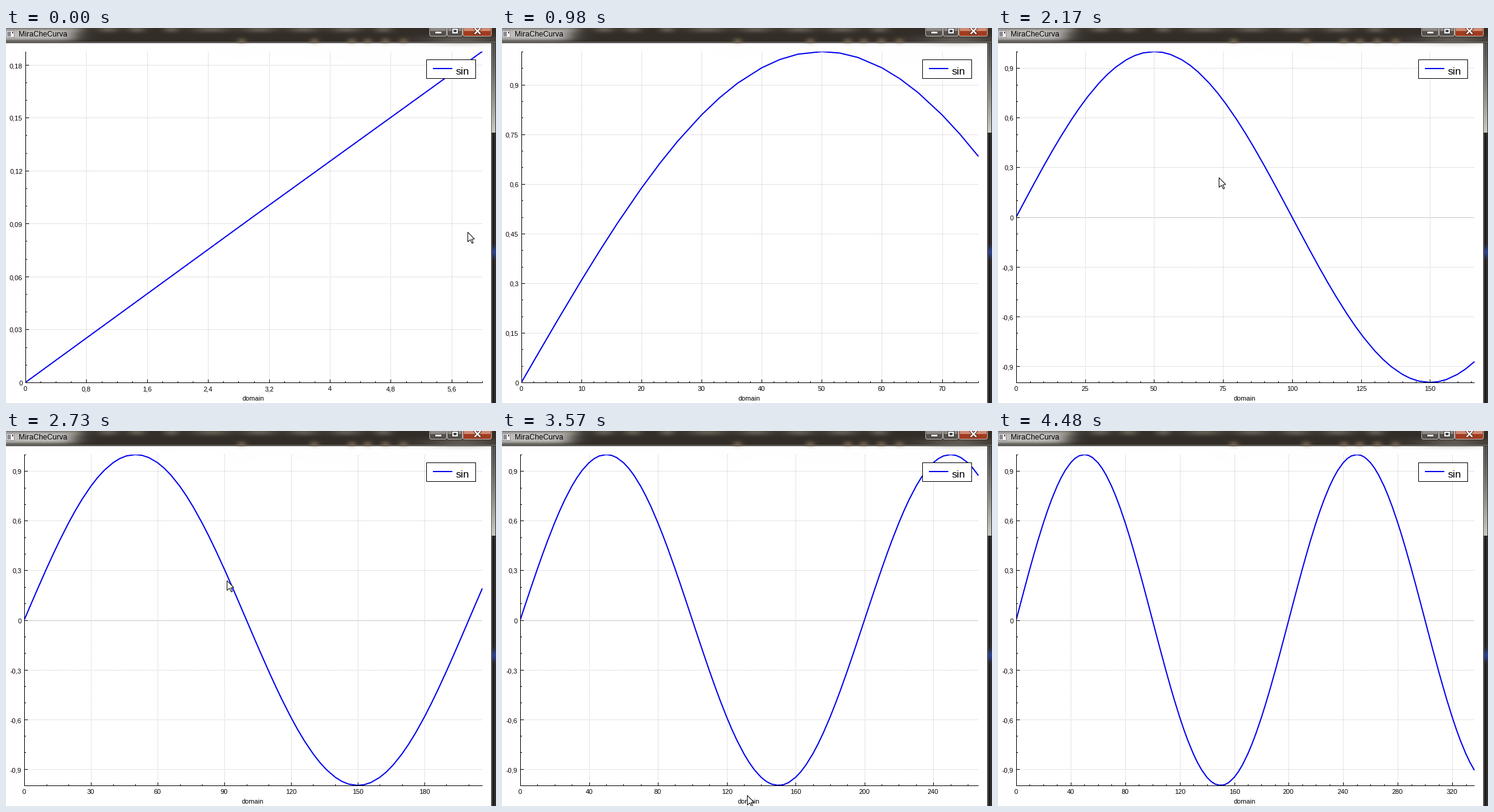
Animation, 808 px wide and 620 px high, one loop 4620 ms. Source, as a matplotlib script:

```python
import math

import numpy as np
import matplotlib.pyplot as plt
from matplotlib.animation import FuncAnimation
from matplotlib.collections import LineCollection
from matplotlib.patches import FancyBboxPatch, Polygon, Rectangle
from matplotlib.transforms import Bbox, TransformedBbox

W, H = 808, 620
STEP = 70
FRAMES = 66
PX = 0.72  # one pixel in points at 100 dpi
TOP, BOTTOM, RIGHT = 39, 586, 785
BLUE = "#0000f0"
GRID = "#c8c8c8"
SUBTICKS = {1: 4, 1.5: 2, 2: 3, 2.5: 4, 3: 2, 3.5: 6, 4: 3, 4.5: 2, 6: 2, 8: 3}

plt.rcParams["font.family"] = "Liberation Sans"


# ---------- window frame ----------

def backdrop():
    y, x = np.mgrid[0:H, 0:W].astype(float)
    img = np.full((H, W, 3), 255.0)

    def blend(mask, rgb):
        img[:] = img * (1 - mask[..., None]) + np.array(rgb) * mask[..., None]

    def spot(cx, cy, sx, sy, rgb, a):
        blend(a * np.exp(-((x - cx) / sx) ** 2 - ((y - cy) / sy) ** 2), rgb)

    blend((y < 25) * 1.0, (50, 45, 39))
    for cx, sx in ((112, 18), (168, 17), (215, 15), (272, 13), (338, 30),
                   (418, 27), (490, 24), (560, 25), (622, 15)):
        spot(cx, 2, sx, 5, (128, 122, 110), 0.6)
    for cx in (388, 508, 570, 596, 625, 655):
        spot(cx, 21, 8, 5, (150, 125, 95), 0.5)
    spot(750, 19, 60, 7, (125, 120, 112), 0.6)
    # soft glow behind the caption
    glow = 1 / (1 + np.exp((x - 112) / 9))
    blend(0.78 * glow * np.exp(-((y - 10) / 11) ** 4), (232, 232, 230))
    blend((y == 23) * 0.55, (190, 188, 184))
    blend((y == 24) * 1.0, (48, 46, 44))

    side = (x >= 800) & (y >= 25)
    blend((side & (y >= 173)) * 1.0, (34, 32, 29))
    shade = np.clip((y - 25) / 148, 0, 1)
    upper = side & (y < 173)
    img[upper] = (80 + 125 * shade[upper] ** 1.3)[:, None] * np.array([1, 0.99, 0.96])
    blend((side & (x == 800)) * 0.8, (60, 59, 57))
    blend((side & (x == 801)) * 0.35, (200, 198, 194))
    blend((side & (x == 806)) * 0.3, (170, 168, 164))
    blend((side & (x == 807)) * 0.8, (25, 24, 22))
    blend((side & (x > 801)) * 0.8 * np.exp(-((y - 370) / 9) ** 2), (45, 70, 165))
    return np.clip(img, 0, 255) / 255


def box(x, y, w, h, fill, edge="none", lw=1, z=2):
    ax.add_patch(Rectangle((x, y), w, h, fc=fill, ec=edge, lw=lw * PX,
                           snap=False, zorder=z))


def button(x, w, dark, light):
    ax.add_patch(FancyBboxPatch((x + 0.5, -8), w - 1, 21.5, fc=dark, ec="#bdb8b2", lw=PX,
                                boxstyle="round,pad=0,rounding_size=3",
                                snap=False, zorder=2))
    box(x + 2, 0, w - 4, 5, light)


def window():
    ax.imshow(backdrop(), extent=(0, W, H, 0), interpolation="nearest", aspect="auto")
    box(0.5, 4.5, 13, 11, "#f4f4f4", "#8a8a8a")
    box(2, 6, 6, 8, "#8b8b94")
    box(10, 6, 2, 3, "#50506a")
    ax.text(20.5, 14, "MiraCheCurva", size=12.4 * PX, zorder=3)

    button(698, 29, "#55504b", "#8d8883")
    button(727, 26, "#55504b", "#8d8883")
    button(753, 48, "#a23c22", "#cf8a72")
    box(707.5, 5.5, 11, 4, "white", "#404040")
    box(735.5, 0.5, 10, 9, "white", "#404040")
    box(738.5, 3.5, 4, 3, "#55504b", "#404040")
    for color, lw in (("#402018", 4.2), ("white", 2.4)):
        for a, b in ((1, 9), (9, 1)):
            ax.plot([773.5, 781.5], [a, b], color=color, lw=lw * PX, zorder=3)


def legend():
    box(693.5, 52.5, 81, 31, "white", "black", z=8)
    ax.plot([704, 736], [67, 67], color=BLUE, lw=2 * PX, solid_capstyle="butt", zorder=9)
    ax.text(741.5, 77, "sin", size=17.5 * PX, zorder=9)


# ---------- plot ----------

def tick_step(size):
    raw = size / (6 + 1e-10)
    mag = 10.0 ** math.floor(math.log10(raw))
    m = raw / mag
    m = int(m * 2) / 2 if m < 5 else int(m / 2) * 2
    return m * mag, SUBTICKS.get(m, 4)


def multiples(lo, hi, step):
    first = math.ceil(lo / step - 1e-9)
    last = math.floor(hi / step + 1e-9)
    return [round(k * step, 9) for k in range(first, last + 1)]


def label(v):
    return f"{v + 0.0:.6g}".replace(".", ",")


def label_width(s):
    return sum({",": 3, "-": 4}.get(c, 6) for c in s)


def pixel(v):
    return math.floor(v + 0.5) + 0.5


def lines(z, color, style="solid"):
    # snapping would push half-pixel centres to the next pixel
    c = LineCollection([], colors=color, linewidths=PX, linestyles=style,
                       antialiaseds=False, capstyle="butt", snap=False, zorder=z)
    ax.add_collection(c)
    return c


def put(x, y, s, ha):
    texts.append(ax.text(x, y, s, size=11 * PX, ha=ha, va="baseline", zorder=6))


def draw_plot(n):
    xs = np.array([k * 10 // 3 for k in range(n * 3 // 10 + 2) if k * 10 // 3 <= n])
    ys = np.sin(np.pi * xs / 100)
    lo, hi = ys.min(), ys.max()

    x_step, x_sub = tick_step(n)
    y_step, y_sub = tick_step(hi - lo)
    x_ticks = multiples(0, n, x_step)
    y_ticks = multiples(lo, hi, y_step)
    left = 11 + max(label_width(label(v)) for v in y_ticks)

    def to_x(v):
        return left + v / n * (RIGHT - left)

    def to_y(v):
        return BOTTOM - (v - lo) / (hi - lo) * (BOTTOM - TOP)

    dots, zero = [], []
    marks = [[(left + 0.5, TOP), (left + 0.5, BOTTOM + 1)],
             [(left, BOTTOM + 0.5), (RIGHT + 1, BOTTOM + 0.5)]]

    def x_mark(v, size):
        p = pixel(to_x(v))
        marks.append([(p, BOTTOM - size), (p, BOTTOM)])
        return p

    def y_mark(v, size):
        p = pixel(to_y(v))
        marks.append([(left + 1, p), (left + 1 + size, p)])
        return p

    for v in multiples(0, n, x_step / (x_sub + 1)):
        x_mark(v, 2)
    for v in multiples(lo, hi, y_step / (y_sub + 1)):
        y_mark(v, 2)
    for v in x_ticks:
        p = x_mark(v, 5)
        dots.append([(p, BOTTOM), (p, TOP)])
        put(p - 0.5, 600, label(v), "center")
    for v in y_ticks:
        p = y_mark(v, 5)
        (zero if v == 0 else dots).append([(left, p), (RIGHT, p)])
        put(left - 4.5, p + 4.5, label(v), "right")
    put((left + RIGHT) / 2 - 1, 616, "domain", "center")

    grid.set_segments(dots)
    base.set_segments(zero)
    axes.set_segments(marks)
    curve.set_data(to_x(xs), to_y(ys))
    area = Bbox.from_extents(left, BOTTOM + 1, RIGHT + 1, TOP)
    curve.set_clip_box(TransformedBbox(area, ax.transData))


# ---------- motion ----------

def sample_count(t):
    late = STEP * ((t >= 1330) + (t >= 3220))
    return 6 + 10 * ((t + late) // 140)


def cursor_at(t):
    if t <= 630:
        u = t / 630
        u = 0.5 * u + 0.5 * u * u * (3 - 2 * u)
        return 761 * (1 - u), 337 - 60 * u
    if 1820 <= t <= 3360:
        u = min(1, (t - 1820) / 350)
        u = 1 - (1 - u) ** 2
        return 364 * u, 290 - 43 * u
    if 3360 < t <= 3570:
        u = (t - 3360) / 210
        return 364 + 40 * u, 247 + 355 * u ** 1.5
    return None


def draw(i):
    t = i * STEP
    while texts:
        texts.pop().remove()
    draw_plot(sample_count(t))
    pos = cursor_at(t)
    cursor.set_visible(pos is not None)
    if pos:
        cursor.set_xy(ARROW + np.round(pos) + 0.5)
    return []


fig = plt.figure(figsize=(W / 100, H / 100), dpi=100, facecolor="white")
ax = fig.add_axes([0, 0, 1, 1])
window()
legend()

texts = []
grid = lines(2, GRID, (0, (1, 2)))
base = lines(2, GRID)
axes = lines(5, "black")
curve, = ax.plot([], [], color=BLUE, lw=2 * PX, solid_joinstyle="round", zorder=4)
ARROW = np.array([(0, 0), (0, 16), (4, 12.5), (7, 18.5), (9, 17.5), (6.3, 11.7), (11, 11.3)])
cursor = Polygon(ARROW, fc="white", ec="black", lw=PX, zorder=10)
ax.add_patch(cursor)

ax.set_xlim(0, W)
ax.set_ylim(H, 0)
ax.axis("off")

anim = FuncAnimation(fig, draw, frames=FRAMES, interval=STEP, repeat=True,
                     repeat_delay=0, init_func=lambda: draw(0), blit=False)
plt.show()
```
